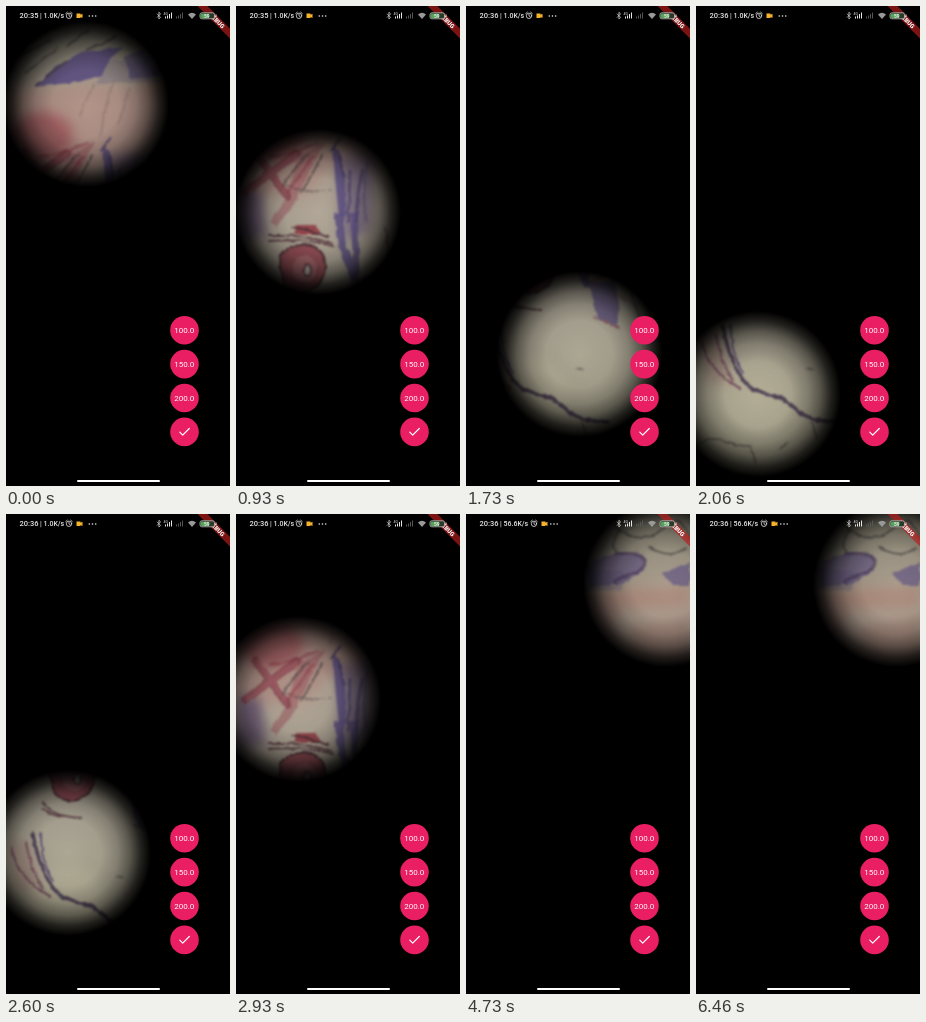
These frames come from a looping animation (224 by 480 pixels, 6520 ms). An HTML page:

```html
<!DOCTYPE html>
<html lang="en">
<head>
<meta charset="utf-8">
<title>Torch over a drawing</title>
<style>
  html, body { margin: 0; width: 100%; height: 100%; overflow: hidden; background: #000; }
  svg { display: block; width: 224px; height: 480px; font-family: Roboto, sans-serif; }
  .line { fill: none; stroke-linecap: round; stroke-linejoin: round; }
</style>
</head>
<body>
<svg viewBox="0 0 224 480">
  <defs>
    <radialGradient id="beam" gradientUnits="userSpaceOnUse" cx="0" cy="0" r="83">
      <stop offset="0" stop-opacity="0"/>
      <stop offset=".4" stop-opacity=".06"/>
      <stop offset=".6" stop-opacity=".24"/>
      <stop offset=".75" stop-opacity=".49"/>
      <stop offset=".88" stop-opacity=".8"/>
      <stop offset="1"/>
    </radialGradient>
    <linearGradient id="paper" x1="0" y1="0" x2="0" y2="1">
      <stop offset="0" stop-color="#969280"/>
      <stop offset=".22" stop-color="#b5a596"/>
      <stop offset=".6" stop-color="#b0a999"/>
      <stop offset="1" stop-color="#a5a189"/>
    </linearGradient>
    <filter id="soft" color-interpolation-filters="sRGB">
      <feTurbulence type="fractalNoise" baseFrequency=".12" numOctaves="2" seed="4" result="grain"/>
      <feDisplacementMap in="SourceGraphic" in2="grain" scale="4" xChannelSelector="R" yChannelSelector="G"/>
      <feGaussianBlur stdDeviation=".8"/>
    </filter>
    <filter id="wash" x="-30%" y="-30%" width="160%" height="160%"><feGaussianBlur stdDeviation="6"/></filter>
  </defs>

  <rect width="224" height="480" fill="url(#paper)"/>

  <g filter="url(#wash)">
    <path d="M0 84L95 78 150 84 150 165 95 160 70 190 0 190Z" fill="#b38580" opacity=".5"/>
    <ellipse cx="36" cy="130" rx="32" ry="25" fill="#a24d56" opacity=".65"/>
    <path d="M30 20L150 20 155 45 70 50 20 80 0 70Z" fill="#7f7d72" opacity=".45"/>
    <path d="M130 76L224 72V92L150 96Z" fill="#b38577" opacity=".6"/>
    <path d="M165 112L224 102V150H160Z" fill="#a98276" opacity=".5"/>
    <path d="M0 180L25 185 30 230 0 235Z" fill="#67517a" opacity=".7"/>
    <path d="M102 150L140 145 136 225 105 235Z" fill="#66567e" opacity=".6"/>
    <path d="M0 325L25 330 40 385 10 375Z" fill="#9d8177" opacity=".6"/>
    <circle cx="62" cy="390" r="38" fill="#b8b39b" opacity=".7"/>
  </g>

  <g filter="url(#soft)">
    <path d="M62 149L88 136 58 198 40 222 34 216 52 190Z" fill="#98505a" opacity=".5"/>
    <path d="M90 78L104 53 158 58 156 76Z" fill="#847984" opacity=".6"/>
    <g fill="#605385">
      <path d="M28 81L48 62 75 46 117 41 103 54 97 69 72 76Z" opacity=".9"/>
      <path d="M118 50L152 38 178 42 176 57 157 70 124 73Z" opacity=".65"/>
      <path d="M196 59L224 48V72L206 72Z" opacity=".65"/>
      <path d="M97 140L104 147 109 174 110 210 103 210 99 170Z" opacity=".85"/>
      <path d="M98 207H107L110 242 117 252 114 207H122L124 282H118L104 246Z" opacity=".85"/>
      <path d="M123 276L149 275 154 304 151 319 132 312Z" opacity=".75"/>
    </g>

    <g class="line" stroke="#4d4747" stroke-width="2" opacity=".75">
      <path d="M10 52L44 34M20 66L52 42M60 40L82 24M80 44L110 31M30 80L62 54"/>
      <path d="M44 184Q56 164 72 148M66 186L86 150"/>
      <path d="M88 78Q78 97 74 110M108 76Q98 99 95 130M124 83L112 118" stroke-width="1.5" opacity=".35"/>
      <path d="M148 12Q175 34 196 15T224 25M153 18Q143 30 150 39M183 33Q204 46 221 34"/>
      <path d="M149 40Q174 37 178 46T163 61 150 70" stroke="#504061" stroke-width="3"/>
      <path d="M50 180Q75 188 96 184" stroke-width="1"/>
      <path d="M150 222Q151 244 159 269T178 323" stroke-width="1.5"/>
      <path d="M0 441Q14 429 29 435T55 440L60 458M84 443L91 438M116 416L121 432M111 362l7 2" stroke-width="1.5"/>
    </g>

    <g class="line" stroke="#504370" stroke-width="3">
      <path d="M127 164Q121 183 120 215M114 165L112 215M104 132L96 144M103 150L108 170" opacity=".7"/>
      <path d="M131 157Q126 190 131 215" opacity=".35"/>
      <path d="M27 319Q31 346 42 366T70 388 100 403 142 416" stroke="#514458" stroke-width="3.5"/>
      <path d="M35 319Q35 350 47 367" stroke-width="1.5"/>
    </g>

    <g class="line" stroke="#8d3946">
      <path d="M9 186L61 147M19 146L51 190" stroke="#813a45" stroke-width="8" opacity=".65"/>
      <path d="M12 185L60 149M22 147L49 186" stroke="#a55e67" stroke-width="4" opacity=".75"/>
      <path d="M34 151Q62 146 82 137M77 151L51 187" stroke-width="2.5" opacity=".5"/>
      <path d="M5 333Q13 367 44 382M20 329Q24 353 36 374" stroke="#795261" stroke-width="2"/>
    </g>

    <path d="M61 219H80L85 228H58Z" fill="#984b50"/>
    <g class="line" stroke="#513039" stroke-width="2" opacity=".85">
      <path d="M34 229Q65 228 96 237M33 235Q63 232 98 240M56 221Q75 224 91 231"/>
      <path d="M36 287Q42 302 75 304M37 296Q48 303 61 303"/>
    </g>
    <path d="M45 250Q51 239 67 239T88 251Q92 269 81 280T54 284Q41 273 45 250Z" fill="#975259" stroke="#50333a" stroke-width="2"/>
    <ellipse cx="69" cy="263" rx="13" ry="14" fill="#a2656a" stroke="#804850" stroke-opacity=".6"/>
    <ellipse cx="71" cy="264" rx="4" ry="6" fill="#b9afa7" stroke="#54383e" stroke-width="1.5"/>
    <path class="line" d="M125 276L150 265M128 311L153 321M147 286L159 294" stroke="#8e5962" stroke-width="1.5"/>
  </g>

  <rect id="shade" x="-500" y="-500" width="1000" height="1000" fill="url(#beam)"/>

  <g transform="translate(224 0) rotate(45)">
    <rect x="-40" y="16" width="80" height="7" fill="#b71c1c" opacity=".68"/>
    <text x="1" y="21.7" font-size="6" font-weight="900" fill="#fff" text-anchor="middle">DEBUG</text>
  </g>

  <g fill="#e6e6e6">
    <g font-weight="500">
      <text id="clock" x="13.5" y="12.3" font-size="7.5"></text>
      <text x="34" y="12" font-size="7">|</text>
      <text id="speed" x="37.5" y="12.2" font-size="7"></text>
    </g>
    <g id="notices">
      <g class="line" stroke="#ddd" stroke-width=".8">
        <circle cx="63" cy="9.8" r="2.7"/>
        <path d="M63 8v2l1.3.8M59.7 7.6l1.6-1.4M66.3 7.6l-1.6-1.4"/>
      </g>
      <path d="M70.5 7.5h4v1.2l2-1v4.2l-2-1v1.2h-4Z" fill="#f5b32c"/>
    </g>
    <g id="dots">
      <circle cx="83.3" cy="10" r=".8"/><circle cx="86.5" cy="10" r=".8"/><circle cx="89.7" cy="10" r=".8"/>
    </g>
    <path class="line" d="M151.2 8l3.4 3.4-1.7 1.6V6.2l1.7 1.6-3.4 3.5" stroke="#ddd" stroke-width=".7"/>
    <text x="157.5" y="9.2" font-size="3.5">4G</text>
    <path d="M159 12.5v-2h1v2ZM161 12.5v-3h1v3ZM163 12.5v-4.5h1v4.5ZM165 12.5v-6h1v6Z"/>
    <path d="M170 12.5v-2h1v2ZM172 12.5v-3h1v3ZM174 12.5v-4.5h1v4.5ZM176 12.5v-6h1v6Z" fill="#555"/>
    <path d="M182 8.5q4-3.5 8 0l-4 4.5Z" fill="#999"/>
    <rect x="194" y="6.8" width="14.5" height="6" rx="1.8" fill="#283b28" stroke="#bbb" stroke-width=".8"/>
    <rect x="195" y="7.7" width="8" height="4.2" rx="1" fill="#55a557"/>
    <text x="198" y="11.6" font-size="5" font-weight="700">59</text>
    <path d="M209.5 8.5h1V11h-1Z"/>
  </g>

  <g id="buttons" font-size="8" text-anchor="middle"></g>
  <path class="line" d="M173.8 426.2l2.9 2.9 6.6-6.6" stroke="#fff" stroke-width="1.2"/>
  <rect x="71" y="474" width="83" height="2" rx="1" fill="#fff"/>
</svg>
<script>
const byId = id => document.getElementById(id);
const LOOP = 6520, FPS = 15;

// Torch path: time in ms, x, y
const path = [
  [0, 80, 98], [300, 118, 100], [600, 132, 128], [930, 82, 205],
  [1267, 112, 288], [1600, 122, 335], [2000, 74, 372], [2067, 62, 388],
  [2200, 62, 389], [2400, 62, 389], [2933, 62, 185], [3300, 78, 112],
  [3733, 112, 142], [4330, 200, 70], [LOOP, 200, 70]
];

byId('buttons').innerHTML = ['100.0', '150.0', '200.0', ''].map((label, i) => {
  const y = 324.2 + i * 33.9;
  return `<circle cx="178.5" cy="${y}" r="14.3" fill="#e91e63"/>
    <text x="178.3" y="${y + 2.8}" fill="#fff">${label}</text>`;
}).join('');

function slope(i, axis) {
  const before = path[i - 1], here = path[i], after = path[i + 1];
  if (!before || !after) return 0;
  if ((here[axis] - before[axis]) * (after[axis] - here[axis]) <= 0) return 0;
  return (after[axis] - before[axis]) / (after[0] - before[0]);
}

function along(time, axis) {
  const i = path.findIndex((point, k) => k === path.length - 2 || time < path[k + 1][0]);
  const span = path[i + 1][0] - path[i][0];
  const u = (time - path[i][0]) / span, v = 1 - u;
  return v * v * (1 + 2 * u) * path[i][axis] + u * u * (3 - 2 * u) * path[i + 1][axis]
    + span * u * v * (v * slope(i, axis) - u * slope(i + 1, axis));
}

const move = (id, x, y = 0) => byId(id).setAttribute('transform', `translate(${x} ${y})`);

function draw(now) {
  const step = Math.floor((now % LOOP + 7) * FPS / 1000);
  const time = Math.min(step * 1000 / FPS, LOOP);
  const fast = time >= 3400;
  move('shade', along(time, 1), along(time, 2));
  byId('clock').textContent = time < 1700 ? '20:35' : '20:36';
  byId('speed').textContent = fast ? '56.6K/s' : '1.0K/s';
  move('notices', fast ? 5 : 0);
  move('dots', fast ? 1.5 : 0);
}

const start = performance.now();
function tick() {
  draw(performance.now() - start);
  requestAnimationFrame(tick);
}
tick();
</script>
</body>
</html>
```
